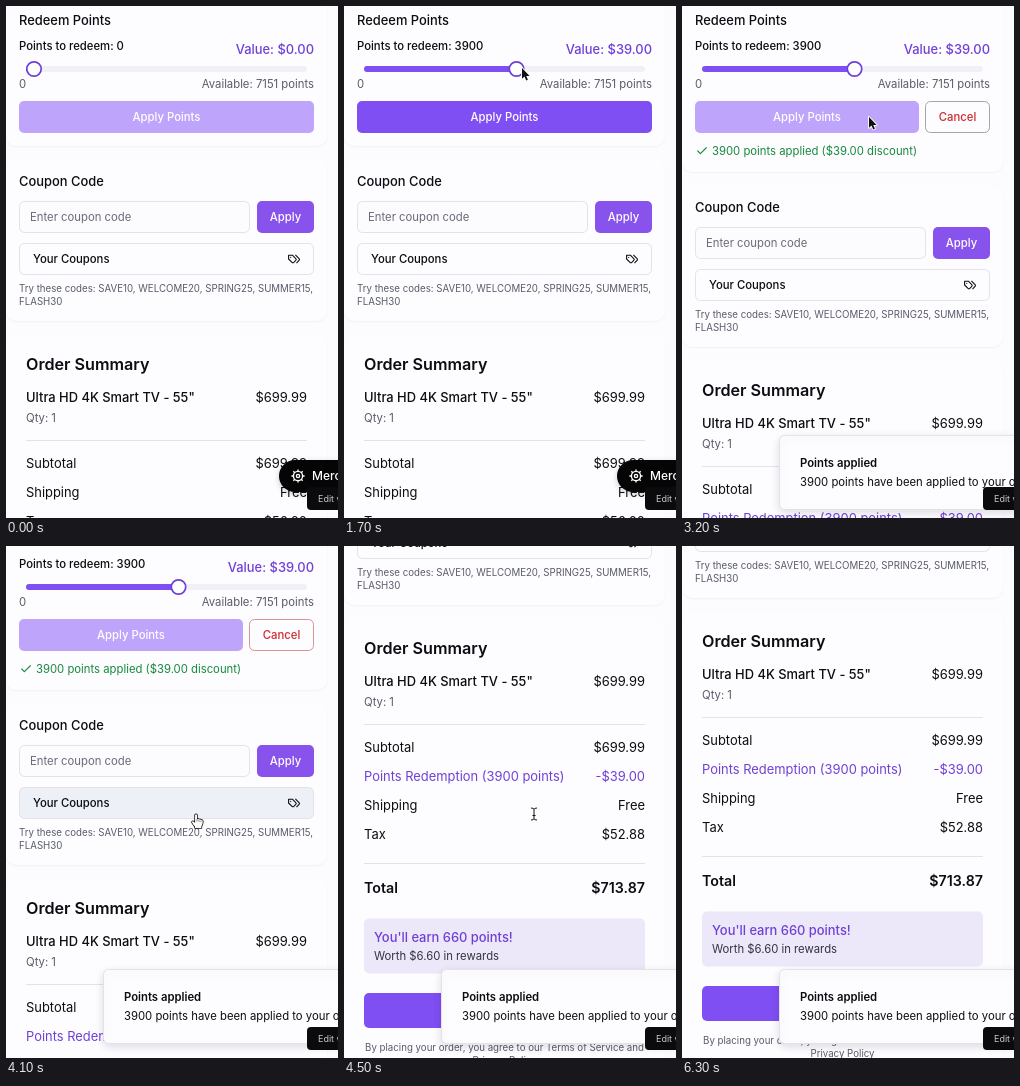
Recreate the animation shown at these times as an HTML page with a canvas. Size 332x512 px, loop 6500 ms.

```html
<!DOCTYPE html>
<html lang="en">
<head>
<meta charset="utf-8">
<title>Checkout</title>
<style>
html, body { margin: 0; width: 100%; height: 100%; overflow: hidden; background: #fcfbfe; }
canvas { display: block; }
</style>
</head>
<body>
<canvas id="stage" width="332" height="512"></canvas>
<script>
const ctx = document.getElementById('stage').getContext('2d');
const LOOP = 6500, STEP = 100;
const APPLIED_AT = 3200, MAX_POINTS = 7151;
const INK = '#0c0c12', MUTED = '#585c69', PURPLE = '#804ff3', ACCENT = '#6f40d6', LINE = '#e3e2ea';

// The page is shown zoomed out, so type sizes are scaled too.
const ZOOM = 0.808;
const XS = 12 * ZOOM, SM = 14 * ZOOM, BASE = 16 * ZOOM, LG = 17.6 * ZOOM, XL = 20 * ZOOM;

// Keyframes are [time, value, ...].
const pointKeys = [[900, 0], [1000, 200], [1100, 800], [1300, 2200], [1500, 3600], [1600, 3900]];
const scrollKeys = [[3800, 0], [3900, 2], [4000, 8], [4100, 22], [4200, 75], [4300, 165],
  [4400, 245], [4500, 282], [4600, 287], [4700, 289]];
const cursorKeys = [[100, 210, 230], [700, 32, 61], [900, 32, 61], [1100, 67, 61], [1600, 178, 62],
  [1900, 178, 62], [2300, 183, 99], [2600, 184, 99], [3000, 187, 111], [3300, 187, 111], [3900, 190, 268]];

const icons = {
  check: new Path2D('M20 6 9 17l-5-5'),
  tags: new Path2D('M9 5H2v7l6.29 6.29c.94.94 2.48.94 3.42 0l3.58-3.58c.94-.94.94-2.48 0-3.42L9 5Z' +
    'M6 9.01V9m9-4 6.3 6.3a2.4 2.4 0 0 1 0 3.4L17 19')
};
const arrow = new Path2D('M0 0V10.8L2.5 8.6L4.2 12.4L5.9 11.7L4.3 7.9H7.6Z');
const hand = new Path2D('M-.9 1Q0-.6 1 1V5.2Q2.3 4.3 3 5.6Q4.3 4.9 5 6.1Q6.6 5.6 6.8 7.3' +
  'Q6.9 10 5.4 12.2V14H-1V12.6Q-2.6 10.8-4 8.4Q-4 6.8-2.4 7.4L-.9 9Z');
const knuckles = new Path2D('M1 5V7.5M3 6V7.8M5 6.4V8');
const beam = new Path2D('M-3-6Q0-6 0-4.5Q0-6 3-6M0-4.5V4.5M-3 6Q0 6 0 4.5Q0 6 3 6M-1.5 1.5H1.5');

function sample(keys, t) {
  if (t <= keys[0][0]) return keys[0].slice(1);
  const i = keys.findIndex(k => k[0] > t);
  if (i < 0) return keys[keys.length - 1].slice(1);
  const a = keys[i - 1], b = keys[i], u = (t - a[0]) / (b[0] - a[0]);
  return a.slice(1).map((v, j) => v + (b[j + 1] - v) * u);
}

// y is the middle of the capital letters.
function text(str, x, y, size, { weight = 400, color = INK, align = 'left' } = {}) {
  ctx.font = `${weight} ${size}px Inter, sans-serif`;
  ctx.textAlign = align;
  ctx.fillStyle = color;
  ctx.fillText(str, x, y + size * 0.363);
}

function box(x, y, w, h, r, fill, stroke) {
  ctx.beginPath();
  if (stroke) ctx.roundRect(x + .5, y + .5, w - 1, h - 1, r);
  else ctx.roundRect(x, y, w, h, r);
  ctx.fillStyle = fill;
  ctx.fill();
  if (stroke) {
    ctx.lineWidth = 1;
    ctx.strokeStyle = stroke;
    ctx.stroke();
  }
}

function shadowBox(shadow, blur, dy, ...args) {
  ctx.save();
  ctx.shadowColor = shadow;
  ctx.shadowBlur = blur;
  ctx.shadowOffsetY = dy;
  box(...args);
  ctx.restore();
}

const card = (y, h) => shadowBox('rgba(60,40,110,.05)', 2, 1, 0, y, 321, h, 10, '#fdfcff');

function icon(path, x, y, size, color) {
  ctx.save();
  ctx.translate(x, y);
  ctx.scale(size / 24, size / 24);
  ctx.lineWidth = 2;
  ctx.lineCap = ctx.lineJoin = 'round';
  ctx.strokeStyle = color;
  ctx.stroke(path);
  ctx.restore();
}

function button(label, x, y, w, color) {
  box(x, y, w, 32, 5, color);
  text(label, x + w / 2, y + 16, SM, { weight: 500, color: '#fff', align: 'center' });
}

function row(label, value, y, style = {}, size = BASE) {
  text(label, 20, y, size, style);
  text(value, 301, y, size, { ...style, align: 'right' });
}

function pointsCard(points, applied, t) {
  const knob = 28 + 265 * points / MAX_POINTS;
  card(-40, applied ? 206 : 180);
  text('Redeem Points', 13, 14.3, BASE, { weight: 500 });
  text('Points to redeem: ' + points, 13, 39.5, SM, { weight: 500 });
  text(`Value: $${(points / 100).toFixed(2)}`, 308, 43.5, BASE, { weight: 500, color: ACCENT, align: 'right' });
  box(20, 60, 281, 6, 3, '#f1eff8');
  box(20, 60, knob - 20, 6, 3, PURPLE);
  ctx.beginPath();
  ctx.arc(knob, 63, 7.2, 0, 7);
  ctx.fillStyle = '#fff';
  ctx.fill();
  ctx.lineWidth = 1.7;
  ctx.strokeStyle = '#6d40d6';
  ctx.stroke();
  text('0', 13, 77.5, SM, { color: MUTED });
  text('Available: 7151 points', 308, 77.5, SM, { color: MUTED, align: 'right' });
  button('Apply Points', 13, 95, applied ? 224 : 295, applied || !points ? '#bea4fa' : PURPLE);
  if (!applied) return;
  box(243, 95, 65, 32, 5, '#fdfcff', t < 3300 ? '#a3a5ad' : '#dc9296');
  text('Cancel', 275.5, 111, SM, { weight: 500, color: '#cf2a2e', align: 'center' });
  icon(icons.check, 13.5, 138.5, 13, '#178a3e');
  text('3900 points applied ($39.00 discount)', 30, 145, SM, { color: '#178a3e' });
}

function couponCard(hovered) {
  card(153, 162);
  text('Coupon Code', 13, 175.5, BASE, { weight: 500 });
  box(13, 195, 231, 32, 5, '#fcfbfe', LINE);
  text('Enter coupon code', 24, 211, SM, { color: '#686b78' });
  button('Apply', 251, 195, 57, '#8853ec');
  box(13, 237, 295, 32, 5, hovered ? '#edf0f6' : '#fdfcff', LINE);
  text('Your Coupons', 27, 253, SM, { weight: 500 });
  icon(icons.tags, 281.5, 246.5, 13, INK);
  text('Try these codes: SAVE10, WELCOME20, SPRING25, SUMMER15,', 13, 282, XS, { color: MUTED });
  text('FLASH30', 13, 295, XS, { color: MUTED });
}

function summaryCard(applied) {
  card(328, 520);
  text('Order Summary', 20, 358, XL, { weight: 600 });
  text('Ultra HD 4K Smart TV - 55"', 20, 391.5, BASE, { weight: 500 });
  row('', '$699.99', 391.5);
  text('Qty: 1', 20, 411.5, SM, { color: MUTED });
  box(20, 434, 281, 1, 0, LINE);
  row('Subtotal', '$699.99', 457);
  ctx.save();
  if (applied) {
    row('Points Redemption (3900 points)', '-$39.00', 486, { color: ACCENT });
    ctx.translate(0, 29);
  }
  row('Shipping', 'Free', 486);
  row('Tax', applied ? '$52.88' : '$56.00', 515);
  box(20, 544, 281, 1, 0, LINE);
  row('Total', '$713.87', 569, { weight: 600 }, LG);
  box(20, 599.5, 281, 55, 5, '#ece8fa');
  text("You'll earn 660 points!", 30, 618.5, BASE, { weight: 500, color: ACCENT });
  text('Worth $6.60 in rewards', 30, 636.5, SM, { color: '#33343f' });
  box(20, 674, 281, 35, 5, PURPLE);
  const small = { color: MUTED, align: 'center' };
  text('By placing your order, you agree to our Terms of Service and', 160.5, 728.5, XS, small);
  text('Privacy Policy', 160.5, 741, XS, small);
  ctx.restore();
}

function merchantPill() {
  shadowBox('rgba(0,0,0,.2)', 6, 2, 273, 454, 120, 32, 16, '#050506');
  ctx.save();
  ctx.translate(292, 470);
  ctx.strokeStyle = '#fff';
  ctx.lineWidth = 1.4;
  ctx.beginPath();
  ctx.arc(0, 0, 4.6, 0, 7);
  ctx.moveTo(1.6, 0);
  ctx.arc(0, 0, 1.6, 0, 7);
  for (let i = 0; i < 8; i++) {
    const c = Math.cos(i * Math.PI / 4), s = Math.sin(i * Math.PI / 4);
    ctx.moveTo(4.6 * c, 4.6 * s);
    ctx.lineTo(6.6 * c, 6.6 * s);
  }
  ctx.stroke();
  ctx.restore();
  text('Merchant', 306, 470, 12, { weight: 500, color: '#fff' });
}

function toast(y) {
  shadowBox('rgba(20,20,40,.13)', 8, 3, 97, y, 290, 75, 5, '#fdfcff', LINE);
  text('Points applied', 118, y + 28, SM, { weight: 600 });
  text('3900 points have been applied to your order.', 118, y + 47, SM);
}

function outlined(path, outline, width, fill) {
  ctx.strokeStyle = outline;
  ctx.lineWidth = width;
  ctx.stroke(path);
  ctx.fillStyle = fill;
  ctx.fill(path);
}

function strokePath(path, color, width) {
  ctx.strokeStyle = color;
  ctx.lineWidth = width;
  ctx.stroke(path);
}

function cursor(kind, x, y) {
  ctx.save();
  ctx.translate(x, y);
  ctx.lineJoin = 'round';
  if (kind === 'beam') {
    strokePath(beam, '#fff', 2.4);
    strokePath(beam, '#111', 1);
  } else if (kind === 'hand') {
    outlined(hand, '#111', 1.6, '#fff');
    strokePath(knuckles, '#333', .6);
  } else {
    outlined(arrow, '#fff', 1.8, '#111');
  }
  ctx.restore();
}

function draw(t) {
  const applied = t >= APPLIED_AT;
  const points = Math.round(sample(pointKeys, t)[0] / 100) * 100;
  const scroll = Math.round(sample(scrollKeys, t)[0]);
  const [x, y] = sample(cursorKeys, t);
  const couponY = 263 - scroll;
  const onCoupons = applied && y >= couponY && y <= couponY + 32;
  const onApply = !applied && t > 2000 && y >= 95;

  ctx.fillStyle = '#fcfbfe';
  ctx.fillRect(0, 0, 332, 512);
  ctx.save();
  ctx.translate(0, -scroll);
  pointsCard(points, applied, t);
  if (applied) ctx.translate(0, 26);
  couponCard(onCoupons);
  summaryCard(applied);
  ctx.restore();

  merchantPill();
  if (applied) toast(t < 3300 ? 429 : 423);
  box(301, 481, 60, 23, 4, '#0b0b0d');
  text('Edit with', 312, 492.5, 9, { color: '#c9c9ce' });

  if (t >= 100 && t < 5000) {
    cursor(scroll > 100 ? 'beam' : onCoupons || onApply ? 'hand' : 'arrow', x, y);
  }
}

function tick(now) {
  draw(Math.floor(now % LOOP / STEP) * STEP);
  requestAnimationFrame(tick);
}
requestAnimationFrame(tick);
</script>
</body>
</html>
```
